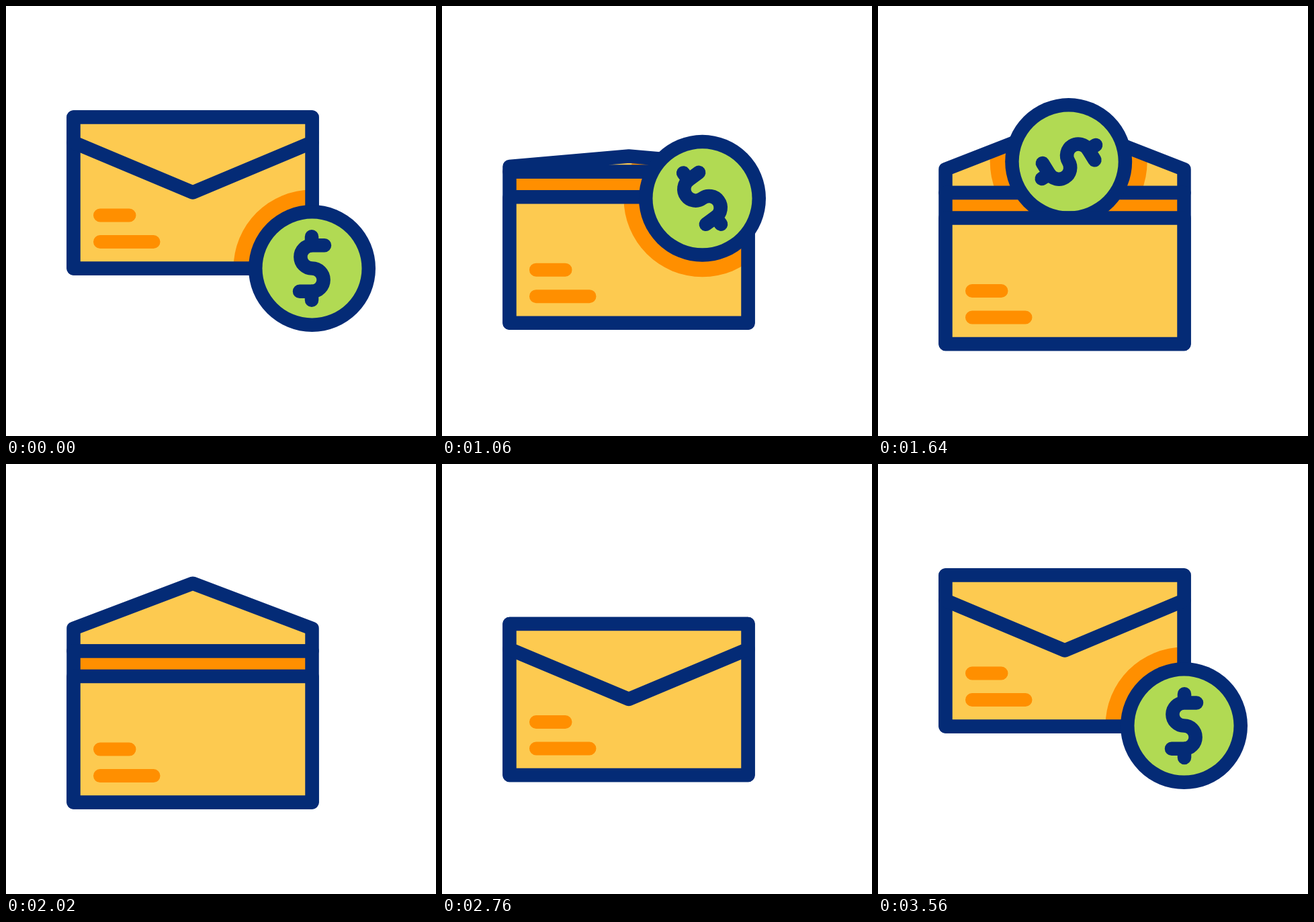
An HTML page with a canvas that plays this animation: 640x640 px, repeating every 3600 ms.

```html
<!DOCTYPE html>
<html lang="en">
<head>
<meta charset="utf-8">
<title>Money envelope</title>
<style>
  html, body { margin: 0; width: 100%; height: 100%; overflow: hidden; background: #fff; }
  canvas { display: block; width: 640px; height: 640px; }
</style>
</head>
<body>
<canvas id="stage" width="640" height="640"></canvas>
<script>
const ctx = document.getElementById('stage').getContext('2d');
const LOOP = 3600;
const NAVY = '#042b76', YELLOW = '#fdca50', ORANGE = '#ff8f00', GREEN = '#b1da53';
const LEFT = 100.5, RIGHT = 455.5, TOP = 165.5, POCKET = 203, BOTTOM = 390.5, MID = 278;
const STROKE = 20.5;

// Each track is a list of [time, value] keys joined by an ease in and out.
const tracks = {
  drop: [[800, 0], [1200, 112.5], [2000, 112.5], [2200, 132.3], [2400, 112.5], [2600, 112.5], [3000, 0]],
  flap: [[800, -1], [1000, 0], [1200, .93], [2000, .93], [2200, 0], [2425, -1]],
  pulse: [[3100, 1], [3200, 1.05], [3400, 1]],
  coinX: [[800, 455.5], [1400, 286.8], [2000, 278]],
  coinY: [[800, 390.5], [1400, 132], [2000, 413]],
  fallY: [[2820, -107.5], [3580, 390.5]],
  spin: [[800, 0], [1400, -90], [2000, -180]]
};

function valueAt(keys, t) {
  if (t <= keys[0][0]) return keys[0][1];
  for (let i = 1; i < keys.length; i++) {
    const [t0, a] = keys[i - 1], [t1, b] = keys[i];
    if (t < t1) {
      const u = (t - t0) / (t1 - t0);
      return a + (b - a) * u * u * (3 - 2 * u);
    }
  }
  return keys[keys.length - 1][1];
}

function polygon(points) {
  const path = new Path2D();
  points.forEach(([x, y]) => path.lineTo(x, y));
  path.closePath();
  return path;
}

const panel = top => polygon([[LEFT, top], [RIGHT, top], [RIGHT, BOTTOM], [LEFT, BOTTOM]]);
const back = panel(TOP), front = panel(POCKET);
const marks = new Path2D('M140 311.5H183.5M140 351H219.5');
const dollar = new Path2D('M18.5-34.2H0A17.1 17.1 0 0 0 0 0A17.1 17.1 0 0 1 0 34.2H-18.5M-.5-47.3V-34M-.5 34V47.3');

function flapShape(open) {
  const side = TOP - 37.5 * open, tip = TOP - 112 * open;
  return polygon([[LEFT, TOP], [LEFT, side], [MID, tip], [RIGHT, side], [RIGHT, TOP]]);
}

function line(path, color, width = STROKE) {
  ctx.strokeStyle = color;
  ctx.lineWidth = width;
  ctx.stroke(path);
}

function disc(x, y, r, color) {
  ctx.fillStyle = color;
  ctx.beginPath();
  ctx.arc(x, y, r, 0, 2 * Math.PI);
  ctx.fill();
}

// Fills a paper shape, casts the coin's shadow inside it, then outlines it.
function paper(shape, color, coin) {
  ctx.fillStyle = color;
  ctx.fill(shape);
  if (coin) {
    ctx.save();
    ctx.clip(shape);
    ctx.resetTransform();
    disc(coin.x, coin.y, 117, ORANGE);
    ctx.restore();
  }
  line(shape, NAVY);
}

function drawCoin({ x, y, spin }) {
  ctx.save();
  ctx.resetTransform();
  disc(x, y, 94.5, NAVY);
  disc(x, y, 74, GREEN);
  ctx.translate(x, y);
  ctx.rotate(spin * Math.PI / 180);
  line(dollar, NAVY);
  ctx.restore();
}

function draw(t) {
  const at = name => valueAt(tracks[name], t);
  const falling = t >= 2400;
  const inside = t >= 1400 && t < 2000;
  const hidden = t >= 2000 && !falling;
  const coin = hidden ? null : {
    x: falling ? RIGHT : at('coinX'),
    y: at(falling ? 'fallY' : 'coinY'),
    spin: at('spin')
  };
  const open = at('flap'), pulse = at('pulse');
  const flap = flapShape(open);

  ctx.resetTransform();
  ctx.fillStyle = '#fff';
  ctx.fillRect(0, 0, 640, 640);
  ctx.lineCap = ctx.lineJoin = 'round';

  ctx.translate(MID, MID + at('drop'));
  ctx.scale(pulse, pulse);
  ctx.translate(-MID, -MID);

  if (open > 0) paper(flap, YELLOW, coin);
  paper(back, ORANGE);
  if (inside) drawCoin(coin);
  paper(front, YELLOW, inside ? null : coin);
  line(marks, ORANGE, 20);
  if (open <= 0) paper(flap, YELLOW, coin);
  if (coin && !inside) drawCoin(coin);
}

function tick() {
  draw(performance.now() % LOOP);
  requestAnimationFrame(tick);
}
tick();
</script>
</body>
</html>
```
